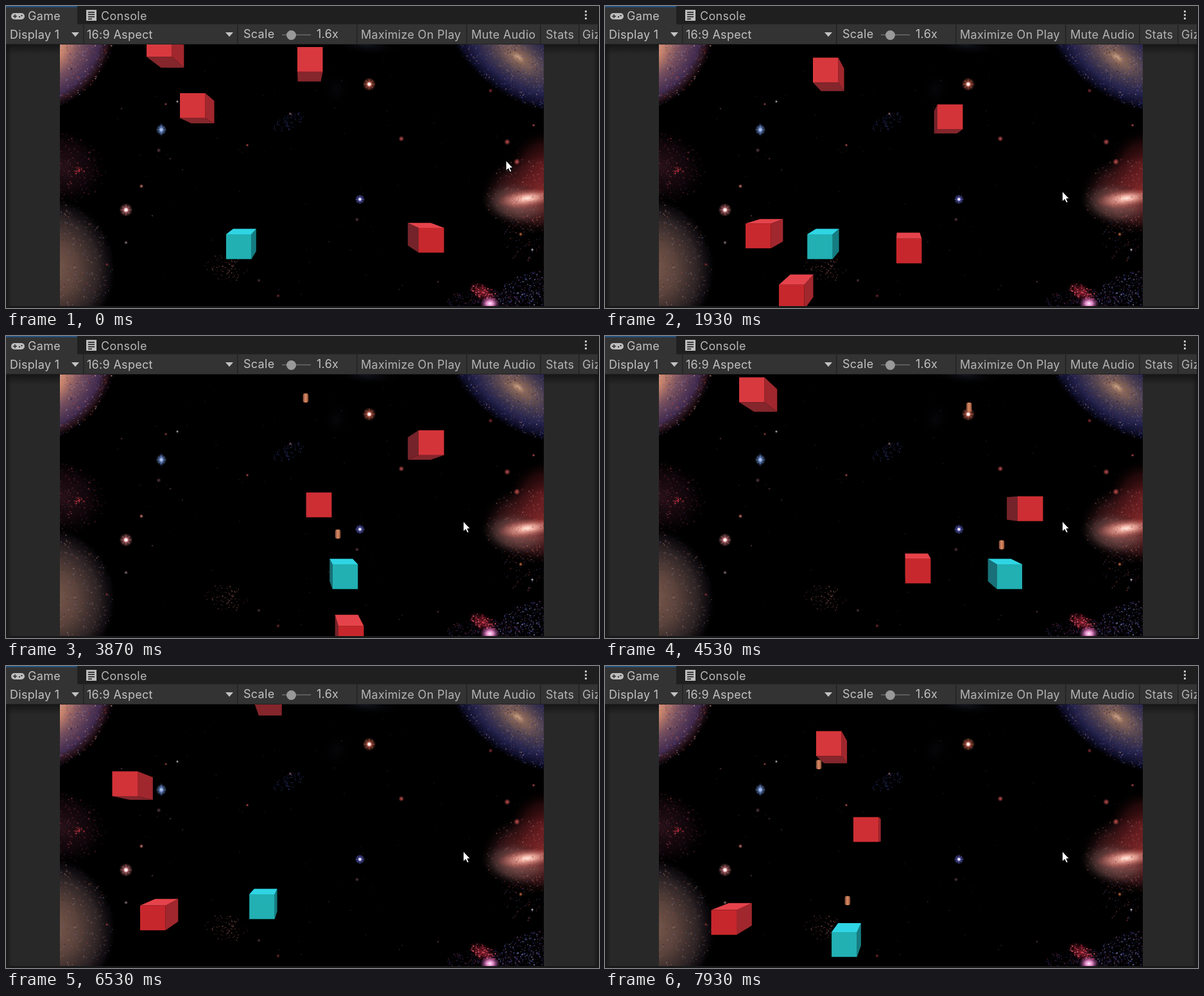
An HTML page with a canvas for the animation above (8 s loop, 924 px wide and 471 px high).

```html
<!DOCTYPE html>
<html lang="en">
<head>
<meta charset="utf-8">
<title>Game view</title>
<style>
html, body { margin: 0; width: 100%; height: 100%; overflow: hidden; background: #282828; }
canvas { display: block; }
</style>
</head>
<body>
<canvas id="stage" width="924" height="471"></canvas>
<script>
const W = 924, H = 471, LOOP = 8000, STEP = 200 / 3;
const VIEW = { x: 84, y: 60, w: 754, h: 408 };
const CX = 461, CY = 264, BACK = 0.907, MID = 0.953;
const SIZE = 39.5, HIGH = 38.7, FALL = 0.1545, SHOT = 0.615;
const ctx = document.getElementById('stage').getContext('2d');

const RED = { top: '#e5434b', bottom: '#84262c', left: '#74232a', right: '#a0272d' };
const CYAN = { front: '#22b0b3', top: '#2fd5e4', bottom: '#14666b', left: '#197078', right: '#157c82' };

// left edge, time at which the top edge is at zero, time of being hit
const cubes = [
  [643, -2239], [271, -880], [454, -414], [219, -262], [518, 940],
  [324, 1412, 2340], [468, 2287], [380, 2747, 3427], [643, 2915, 4860],
  [209, 4116], [165.5, 5470], [387, 6408], [329, 7276]
];
// time fired, time of impact
const shots = [
  [2085, 2340], [2430], [2775], [3120, 3427], [3465], [3810], [4155], [4504],
  [4845, 4860], [5270], [5615], [7188], [7533], [7878]
];
// time, x, y of the player
const path = [
  [0, 343, 356], [1754, 343, 356], [1980, 308, 356], [2080, 308, 356],
  [2330, 270, 356], [2775, 340, 356], [3200, 407, 356], [4530, 610, 356],
  [4773, 647, 356], [5200, 582, 356], [5800, 491, 356], [6908, 322, 356],
  [7094, 293, 385], [7200, 293, 401], [7290, 293, 415], [7440, 293, 415],
  [7533, 307, 415], [7878, 354, 415], [8000, 352, 415]
];
const mouse = [[0, 779, 241], [70, 779, 241], [600, 712.5, 289], [8000, 712.5, 289]];

function along(keys, t) {
  let i = 1;
  while (i < keys.length - 1 && keys[i][0] < t) i++;
  const [a, b] = [keys[i - 1], keys[i]];
  const u = (t - a[0]) / (b[0] - a[0]);
  return [a[1] + (b[1] - a[1]) * u, a[2] + (b[2] - a[2]) * u];
}

function randomizer(seed) {
  return () => {
    seed = (seed * 1664525 + 1013904223) >>> 0;
    return seed / 4294967296;
  };
}

function layer(draw) {
  const c = document.createElement('canvas');
  c.width = W;
  c.height = H;
  draw(c.getContext('2d'));
  return c;
}

function drawSpace(g) {
  const rnd = randomizer(77);
  const pick = list => list[Math.floor(rnd() * list.length)];

  function glow(x, y, rx, ry, turn, ...stops) {
    g.save();
    g.translate(x, y);
    g.rotate(turn);
    g.scale(rx, ry);
    const fill = g.createRadialGradient(0, 0, 0, 0, 0, 1);
    stops.forEach(([at, rgb, a]) => fill.addColorStop(at, `rgba(${rgb},${a})`));
    g.fillStyle = fill;
    g.beginPath();
    g.arc(0, 0, 1, 0, 7);
    g.fill();
    g.restore();
  }

  function specks(x, y, rx, ry, turn, count, colors, alpha, spread = 0.6) {
    const c = Math.cos(turn), s = Math.sin(turn);
    for (let i = 0; i < count; i++) {
      const a = rnd() * 6.283, r = Math.pow(rnd(), spread);
      const u = Math.cos(a) * r * rx, v = Math.sin(a) * r * ry;
      const size = 1 + rnd() * 1.1;
      g.globalAlpha = alpha * (0.25 + 0.75 * rnd());
      g.fillStyle = pick(colors);
      g.fillRect(x + u * c - v * s, y + u * s + v * c, size, size);
    }
    g.globalAlpha = 1;
  }

  function star(x, y, r, rgb) {
    glow(x, y, r * 1.25, r * 1.25, 0, [0, rgb, 0.95], [0.45, rgb, 0.5], [1, rgb, 0]);
    if (r < 5) return;
    g.strokeStyle = `rgba(${rgb},.55)`;
    g.lineWidth = 1;
    g.beginPath();
    for (let i = 0; i < 4; i++) {
      const dx = Math.cos(i * Math.PI / 4) * r, dy = Math.sin(i * Math.PI / 4) * r;
      g.moveTo(x - dx, y - dy);
      g.lineTo(x + dx, y + dy);
    }
    g.stroke();
    glow(x, y, r * 0.5, r * 0.5, 0, [0, '255,255,255', 1], [0.5, '255,245,245', 0.9], [1, rgb, 0]);
  }

  g.beginPath();
  g.rect(VIEW.x, VIEW.y, VIEW.w, VIEW.h);
  g.clip();
  g.fillStyle = '#000';
  g.fillRect(0, 0, W, H);

  // upper left spiral
  glow(62, 68, 118, 90, -0.65, [0, '255,215,185', 1], [0.25, '205,135,110', 1],
    [0.5, '125,85,100', 0.95], [0.78, '72,48,88', 0.9], [0.9, '60,28,40', 0.6], [1, '20,5,15', 0]);
  specks(62, 68, 114, 87, -0.65, 1500, ['#a06a70', '#4a3868', '#d8a8a0', '#23163a', '#8080c0', '#c04838'], 0.65, 0.45);

  // upper right spiral
  glow(798, 80, 128, 62, 0.6, [0, '205,165,135', 1], [0.1, '145,108,92', 0.95],
    [0.35, '82,68,84', 0.95], [0.65, '42,40,88', 0.85], [0.85, '22,22,66', 0.6], [1, '5,5,25', 0]);
  specks(798, 80, 122, 59, 0.6, 1500, ['#3a3f90', '#80758c', '#16163c', '#5a5ab0', '#a88880', '#582c38'], 0.6, 0.5);

  // left clouds
  glow(88, 250, 72, 60, 0.4, [0, '52,22,32', 0.75], [0.6, '28,10,18', 0.55], [1, '0,0,0', 0]);
  specks(92, 250, 64, 50, 0.3, 380, ['#8a2a34', '#582436', '#b84048', '#3a2a50', '#503030'], 0.6);
  specks(113, 257, 8, 6, 0, 24, ['#e04048', '#c03040'], 0.9);
  glow(72, 408, 100, 112, -0.2, [0, '130,95,82', 0.95], [0.4, '100,74,66', 0.9],
    [0.72, '56,44,46', 0.8], [0.9, '24,18,24', 0.5], [1, '0,0,0', 0]);
  specks(84, 400, 82, 96, -0.2, 900, ['#b08a78', '#54403c', '#8a6a60', '#2a2024', '#6a6a9a', '#a04840'], 0.5, 0.5);

  // glowing galaxy on the right
  glow(835, 292, 98, 66, 0, [0, '185,65,62', 0.95], [0.35, '135,44,46', 0.85],
    [0.7, '70,26,30', 0.6], [1, '0,0,0', 0]);
  glow(842, 252, 62, 62, 0, [0, '135,36,40', 0.7], [0.6, '76,18,22', 0.45], [1, '0,0,0', 0]);
  glow(795, 308, 56, 34, 0.15, [0, '180,130,122', 0.6], [0.6, '104,76,74', 0.5], [1, '30,22,24', 0]);
  glow(812, 300, 48, 15, -0.12, [0, '255,235,225', 1], [0.25, '255,190,175', 0.9], [1, '190,70,65', 0]);
  specks(814, 295, 68, 58, 0, 500, ['#c05a54', '#702a2c', '#e09a8c', '#3a1a1c'], 0.4);
  specks(808, 355, 36, 45, 0, 110, ['#603040', '#a04848', '#404070'], 0.6);

  // lower right cluster
  specks(815, 450, 64, 34, -0.4, 550, ['#30388c', '#5a60c0', '#202050', '#a09ad0', '#603060'], 0.75);
  specks(745, 460, 58, 20, 0, 270, ['#402c60', '#7a3050', '#282858'], 0.7);
  glow(742, 446, 24, 14, 0.5, [0, '190,40,60', 0.7], [1, '90,10,30', 0]);
  specks(744, 446, 22, 11, 0.5, 110, ['#d83850', '#902038', '#ff7080'], 0.9);
  glow(754, 464, 16, 12, 0, [0, '255,240,255', 1], [0.35, '235,140,205', 0.95], [1, '120,40,110', 0]);

  // faint patches
  specks(440, 180, 27, 11, -0.5, 75, ['#28306a', '#182050', '#343060'], 0.8);
  specks(343, 408, 34, 20, 0.2, 125, ['#583034', '#382028', '#80504a'], 0.7);
  glow(560, 60, 58, 16, 0.1, [0, '24,26,40', 0.8], [1, '0,0,0', 0]);
  glow(515, 130, 24, 30, 0.2, [0, '10,10,16', 0.7], [1, '0,0,0', 0]);
  specks(461, 264, 370, 195, 0, 95, ['#4a2020', '#303048', '#503838'], 0.55, 0.5);

  star(242, 193, 7, '115,155,225');
  glow(242, 193, 4, 12, 0, [0, '140,180,240', 0.8], [1, '60,80,160', 0]);
  star(187, 318, 8.5, '225,130,135');
  star(566, 122, 8.5, '225,110,90');
  star(551.5, 301.5, 6.5, '105,110,220');
  const pink = '220,90,90', white = '230,225,235', dim = '100,65,70';
  [[616, 207, 3.6, pink], [781, 212, 4, pink], [796, 243, 4, pink], [211, 281, 2.6, '240,140,130'],
    [267, 149, 1.8, white], [443, 168, 2, '170,120,130'], [376, 217, 1.9, pink], [238, 225, 3, dim],
    [755, 132, 2.8, '150,50,60'], [822, 186, 2, pink], [187, 369, 2.4, '160,130,130'],
    [802, 356, 2.6, '220,120,70'], [547, 333, 2.6, dim], [394, 428, 2.2, dim], [424, 452, 2.4, '130,45,50'],
    [820, 380, 1.9, white], [249, 153, 1.7, pink], [157, 403, 2, '150,45,50'], [228, 327, 1.5, dim],
    [673, 430, 1.6, dim], [256, 238, 1.5, dim], [180, 160, 1.5, dim]
  ].forEach(s => star(...s));
}

function drawEditor(g) {
  const box = (x, y, w, h, color) => {
    g.fillStyle = color;
    g.fillRect(x, y, w, h);
  };
  const label = (text, x, y, color = '#c2c2c2') => {
    g.fillStyle = color;
    g.fillText(text, x, y);
  };
  const fade = (x0, y0, x1, y1, x, y, w, h) => {
    const f = g.createLinearGradient(x0, y0, x1, y1);
    f.addColorStop(0, 'rgba(18,18,18,.8)');
    f.addColorStop(1, 'rgba(18,18,18,0)');
    box(x, y, w, h, f);
  };
  const arrow = x => {
    g.fillStyle = '#c2c2c2';
    g.beginPath();
    g.moveTo(x, 41);
    g.lineTo(x + 12, 41);
    g.lineTo(x + 6, 48);
    g.fill();
  };

  box(0, 0, W, H, '#282828');
  fade(0, 60, 0, 76, 0, 60, W, 16);
  fade(0, 0, 9, 0, 0, 60, 9, 408);
  fade(924, 0, 915, 0, 915, 60, 9, 408);
  box(0, 468, W, 3, '#191919');
  box(0, 0, W, 29, '#1f1f1f');
  box(0, 0, 111, 29, '#333333');
  box(0, 0, 111, 2, '#24527f');
  box(0, 29, W, 31, '#333333');
  box(111, 28, W - 111, 1, '#2a2a2a');
  box(0, 59, W, 1, '#222222');
  [120, 360, 546, 717, 832, 892].forEach(x => box(x, 29, 1.5, 30, '#222222'));

  g.font = '18px Inter, "Open Sans", sans-serif';
  g.letterSpacing = '0.3px';
  label('Game', 34, 22);
  label('Console', 148, 22, '#b8b8b8');
  label('Display 1', 6, 51);
  label('16:9 Aspect', 126, 51);
  label('Scale', 370, 50);
  label('1.6x', 484, 50);
  label('Maximize On Play', 553, 51, '#b4b4b4');
  label('Mute Audio', 725, 51, '#b4b4b4');
  label('Stats', 841, 51, '#b4b4b4');
  g.save();
  g.beginPath();
  g.rect(893, 29, 29, 30);
  g.clip();
  label('Gizmos', 898, 51, '#b4b4b4');
  g.restore();
  arrow(102);
  arrow(342);

  box(430, 44, 45, 2, '#5c5c5c');
  g.fillStyle = '#999';
  g.beginPath();
  g.arc(444.5, 45.5, 7.5, 0, 7);
  g.fill();

  // gamepad
  g.fillStyle = '#bdbdbd';
  g.beginPath();
  g.roundRect(8, 11, 21, 10, 5);
  g.fill();
  box(11, 15.2, 6, 1.6, '#333');
  box(13.2, 13, 1.6, 6, '#333');
  box(20, 16, 2, 2, '#333');
  box(23.5, 14, 2, 2, '#333');
  // console sheet
  box(125, 6, 16, 17, '#bdbdbd');
  [9, 12.5, 16].forEach(y => box(128, y, 10, 1.6, '#1f1f1f'));
  box(128, 19.5, 6, 1.6, '#1f1f1f');
  [7, 12.5, 18].forEach(y => box(902, y, 3, 3, '#c2c2c2'));
  box(922, 0, 2, 60, '#1a1a1a');
}

function quad(color, ...p) {
  ctx.fillStyle = color;
  ctx.beginPath();
  for (let i = 0; i < 8; i += 2) ctx.lineTo(p[i], p[i + 1]);
  ctx.fill();
}

function drawCube(x, y, skin, front) {
  const r = x + SIZE, b = y + HIGH;
  const px = v => CX + (v - CX) * BACK, py = v => CY + (v - CY) * BACK;
  if (x > CX) quad(skin.left, x, y, x, b, px(x), py(b), px(x), py(y));
  if (r < CX) quad(skin.right, r, y, r, b, px(r), py(b), px(r), py(y));
  if (y > CY) quad(skin.top, x, y, r, y, px(r), py(y), px(x), py(y));
  if (b < CY) quad(skin.bottom, x, b, r, b, px(r), py(b), px(x), py(b));
  ctx.fillStyle = front;
  ctx.fillRect(x, y, SIZE, HIGH);
}

function redFront(y) {
  const u = Math.min(1, Math.max(0, (y - 60) / 310));
  return `rgb(${216 - 18 * u},${57 - 18 * u},${63 - 19 * u})`;
}

function drawShot(fired, t) {
  const [px, py] = along(path, fired);
  const x = CX + (px + SIZE / 2 - CX) * MID;
  const y = CY + (py - CY) * MID - 8 - SHOT * (t - fired);
  const fill = ctx.createLinearGradient(x - 4.5, 0, x + 4.5, 0);
  fill.addColorStop(0, '#70402e');
  fill.addColorStop(0.45, '#d98a66');
  fill.addColorStop(0.7, '#c47650');
  fill.addColorStop(1, '#6e3e2c');
  ctx.fillStyle = fill;
  ctx.beginPath();
  ctx.roundRect(x - 4.3, y - 7.2, 8.6, 14.4, 3);
  ctx.fill();
}

function drawMouse([x, y]) {
  ctx.beginPath();
  [[0, 0], [0, 16], [3.7, 12.6], [6.3, 18], [8.8, 16.8], [6.4, 11.7], [11, 11.5]]
    .forEach(([dx, dy]) => ctx.lineTo(x + dx, y + dy));
  ctx.closePath();
  ctx.fillStyle = '#fff';
  ctx.strokeStyle = '#000';
  ctx.lineWidth = 1;
  ctx.fill();
  ctx.stroke();
}

const scene = layer(g => {
  drawEditor(g);
  drawSpace(g);
});

function draw(t) {
  ctx.drawImage(scene, 0, 0);
  ctx.save();
  ctx.beginPath();
  ctx.rect(VIEW.x, VIEW.y, VIEW.w, VIEW.h);
  ctx.clip();
  for (const [x, start, end = LOOP] of cubes) {
    const y = (t - start) * FALL;
    if (t < end && y > -40 && y < 500) drawCube(x, y, RED, redFront(y));
  }
  for (const [fired, end = LOOP] of shots) {
    if (t >= fired && t < end && t < fired + 700) drawShot(fired, t);
  }
  drawCube(...along(path, t), CYAN, CYAN.front);
  ctx.restore();
  drawMouse(along(mouse, t));
}

const begin = performance.now();
function tick() {
  const t = (performance.now() - begin) % LOOP;
  draw(Math.floor((t + 4) / STEP) * STEP % LOOP);
  requestAnimationFrame(tick);
}
tick();
</script>
</body>
</html>
```
